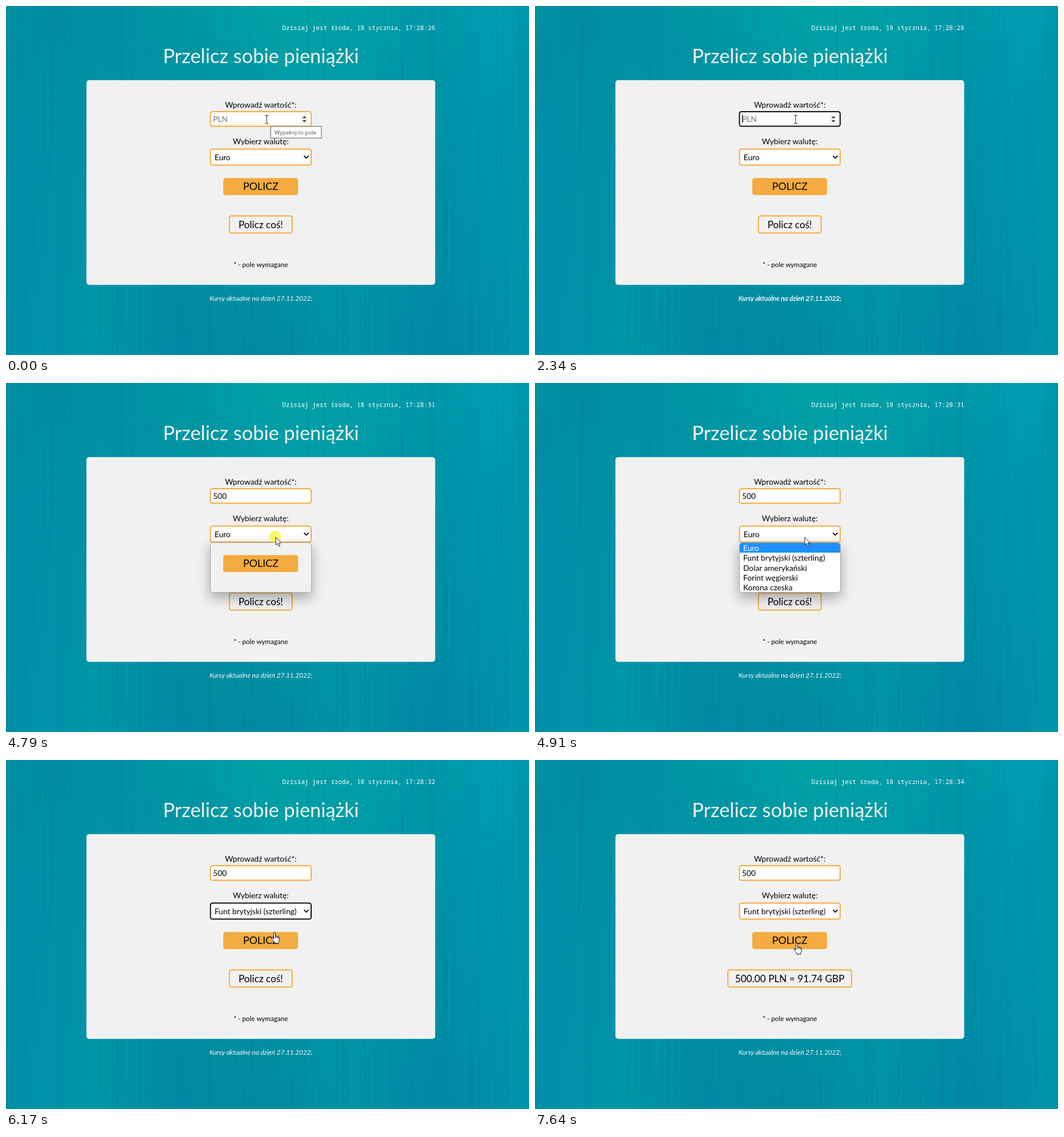
Animation of 917x611 px, one loop 8000 ms. Source, as an HTML page with a canvas:

```html
<!DOCTYPE html>
<html lang="pl">
<head>
<meta charset="utf-8">
<title>Przelicz sobie pieniążki</title>
<style>
html, body { margin: 0; width: 100%; height: 100%; overflow: hidden; }
body {
  position: relative;
  background: linear-gradient(90deg, #008fa5, #008da3 11%, #0097a4 32%, #00a2a6 53%, #00a0a6 65%, #0099ab 82%, #009cb0 93%, #0098ac);
}
canvas, svg { position: absolute; left: 0; top: 0; }
svg { font: 13.75px Lato, sans-serif; }
.mid { text-anchor: middle; }
.big { font-size: 17.2px; }
.small { font-size: 11.7px; }
.field { fill: #fff; stroke: #f4ab3f; stroke-width: 2; }
.focus { stroke: #111; }
#popup {
  position: absolute; left: 357.5px; top: 279.3px; width: 176px; height: 85.8px;
  border: 1px solid #aaa; border-radius: 5px; overflow: hidden;
  box-shadow: 0 9px 22px rgba(0, 0, 0, .32);
  font: 13.75px/17.16px Lato, sans-serif;
}
#popup div { padding-left: 6.5px; white-space: nowrap; }
#popup.full { background: #fff; }
#popup:not(.full) div { visibility: hidden; }
#popup .on { background: #1e90ff; color: #fff; }
</style>
</head>
<body>
<canvas id="wall" width="917" height="611"></canvas>

<svg width="917" height="611">
  <text id="clock" x="752.5" y="42" text-anchor="end" fill="#fff" style="font:10.9px 'Noto Sans Mono',monospace"></text>
  <text class="mid" x="447" y="100" fill="#f1f1f1" font-size="34.4">Przelicz sobie pieniążki</text>
  <rect x="141" y="129.7" width="611.5" height="358.5" rx="5" fill="#f1f1f1"/>

  <text class="mid" x="446.7" y="177.5">Wprowadź wartość*:</text>
  <rect id="amountBox" class="field" x="358.5" y="185" width="176.5" height="25.5" rx="3.5"/>
  <text id="amount" x="363" y="203"></text>
  <rect id="caret" y="190" width="1" height="15"/>
  <g id="spinner">
    <path fill="#efefef" d="M517 190h12v16h-12z"/>
    <path fill="#333" d="M519.8 196.3l3.4-3.6 3.4 3.6zM519.8 199.9l3.4 3.6 3.4-3.6z"/>
  </g>

  <text class="mid" x="446.7" y="242">Wybierz walutę:</text>
  <rect id="currencyBox" class="field" x="358.5" y="250.5" width="176.5" height="28" rx="3.5"/>
  <text id="currency" x="365.8" y="270"></text>
  <path d="M522.5 262.3l4 4 4-4" fill="none" stroke="#000" stroke-width="1.8"/>

  <rect x="381" y="301.3" width="131" height="29.7" rx="4" fill="#f4ab3f"/>
  <text class="mid" x="446.7" y="322.3" font-size="17.9">POLICZ</text>

  <rect id="resultBox" class="field" style="fill:none" y="367.5" height="30" rx="3.5"/>
  <text id="result" class="mid big" x="446.7" y="388.6"></text>
  <text class="mid small" x="446.7" y="456.5">* - pole wymagane</text>
  <text id="footer" class="mid small" x="447" y="515.8" fill="#f4f8f8" stroke="#f4f8f8" font-style="italic">Kursy aktualne na dzień 27.11.2022;</text>

  <g id="hint">
    <rect x="464" y="210.8" width="89" height="20.4" fill="#fff" stroke="#555"/>
    <text class="mid" x="508.7" y="225" fill="#505050" style="font:9.8px 'Open Sans',sans-serif">Wypełnij to pole.</text>
  </g>
</svg>

<div id="popup"></div>

<svg width="917" height="611">
  <g id="pointer" stroke-linejoin="round">
    <circle id="click" cx="-1" cy="-1" r="10.5" fill="#fff200" fill-opacity=".6"/>
    <path id="beam" fill="none" stroke="#222" d="M-3-6.5h2.2L0-6 .8-6.5H3M0-6V7M-3 7.5h2.2L0 7 .8 7.5H3"/>
    <path id="arrow" fill="#fff" stroke="#111" stroke-width=".9" d="M0 0V13.3L3 10.5 5.3 15.8 7.5 14.9 5.2 9.7H9.4Z"/>
    <path id="hand" fill="#fff" stroke="#111" stroke-width="1" transform="translate(-5.5)"
      d="M4.5 12.5V2.2Q4.5.6 6 .6T7.5 2.2V7.3Q9.3 6.2 10 7.9 11.8 7 12.2 8.8 14.2 8.2 14.2 10.3V14Q14 16 12.8 17.5V20H6V18.3Q3 15.5.9 12 .3 10 2.2 10.4 3.5 11 4.5 12.5ZM7.5 7.3V11M10 8V11M12.2 8.8V11.5"/>
  </g>
</svg>

<script>
const LOOP = 8000;
const $ = id => document.getElementById(id);
const show = (id, on) => { $(id).style.visibility = on ? 'visible' : 'hidden'; };
const within = (t, ...spans) => spans.some(([from, to]) => t >= from && t < to);
const passed = (t, times) => times.filter(at => t >= at).length;

const ticks = [680, 1700, 2670, 3640, 4650, 5540, 6640, 7640];
const keyPresses = [2400, 2730, 2940];
const options = ['Euro', 'Funt brytyjski (szterling)', 'Dolar amerykański', 'Forint węgierski', 'Korona czeska'];

// Pointer path: time, x, y of the hot spot
const path = [
  [3980, 457, 198], [4050, 458, 212], [4130, 461, 245], [4200, 465.5, 268.5],
  [4300, 470, 278], [4450, 472, 276], [4650, 473, 270.3],
  [5440, 473, 270.3], [5640, 470.3, 293], [5870, 470.5, 301],
  [6370, 470.5, 301], [6490, 456.8, 324], [6640, 456.8, 324], [6770, 458.7, 320]
];

function pointerAt(t) {
  const next = path.findIndex(key => key[0] > t);
  if (next === 0) return path[0].slice(1);
  if (next < 0) return path[path.length - 1].slice(1);
  const [t0, x0, y0] = path[next - 1], [t1, x1, y1] = path[next];
  const k = (t - t0) / (t1 - t0);
  return [x0 + (x1 - x0) * k, y0 + (y1 - y0) * k];
}

function paintWall() {
  const c = $('wall').getContext('2d');
  const fill = (x, y, colors) => {
    const g = c.createLinearGradient(0, 0, x, y);
    colors.forEach((color, i) => g.addColorStop(i / (colors.length - 1), color));
    c.fillStyle = g;
    c.fillRect(0, 0, 917, 611);
  };
  fill(917, 0, ['#008fa8', '#0096a9', '#0089a2', '#008aa2', '#0092a7', '#0087a2', '#0095ac']);
  c.globalCompositeOperation = 'destination-in';
  fill(0, 611, ['#0000', '#0006', '#000a', '#000']);
  c.globalCompositeOperation = 'source-over';

  let seed = 7;
  const rnd = () => (seed = seed * 16807 % 2147483647) / 2147483647;
  for (let i = 0; i < 700; i++) {
    c.fillStyle = rnd() < .5 ? 'rgba(0,190,190,.05)' : 'rgba(0,90,130,.05)';
    c.fillRect(rnd() * 917, rnd() * 800 - 200, 1 + rnd() * 2, 60 + rnd() * 340);
  }
}

function draw(t) {
  $('clock').textContent = 'Dzisiaj jest środa, 18 stycznia, 17:28:' + (26 + passed(t, ticks));

  const typed = passed(t, keyPresses);
  $('amount').textContent = typed ? '500'.slice(0, typed) : 'PLN';
  $('amount').style.fill = typed ? '#000' : '#757575';
  $('amountBox').classList.toggle('focus', within(t, [1280, 4790]));
  $('caret').setAttribute('x', 363 + 7.8 * typed);
  show('caret', within(t, [1280, 1790], [2340, 3430], [3980, 4530]));
  show('spinner', t < 4790);
  show('hint', t < 1190);
  $('footer').style.strokeWidth = within(t, [1190, 4790]) ? .35 : 0;

  const [x, y] = pointerAt(t);
  $('currency').textContent = options[t < 6040 ? 0 : 1];
  $('currencyBox').classList.toggle('focus', within(t, [6040, 7100]));
  $('popup').style.display = within(t, [4790, 6040]) ? 'block' : 'none';
  $('popup').classList.toggle('full', t >= 4860);
  [...$('popup').children].forEach((row, i) => row.classList.toggle('on', i === (y < 298 ? 0 : 1)));

  const done = t >= 7230;
  const half = done ? 108.5 : 55;
  $('result').textContent = done ? '500.00 PLN = 91.74 GBP' : 'Policz coś!';
  $('resultBox').setAttribute('x', 446.7 - half);
  $('resultBox').setAttribute('width', 2 * half);

  $('pointer').setAttribute('transform', `translate(${x} ${y})`);
  const shape = y < 211 ? 'beam' : t < 6170 ? 'arrow' : 'hand';
  for (const id of ['beam', 'arrow', 'hand']) show(id, id === shape);
  show('click', within(t, [1190, 1380], [4790, 4910], [6040, 6170], [7100, 7230]));
}

function frame() {
  draw(performance.now() % LOOP);
  requestAnimationFrame(frame);
}

for (const name of options) {
  const row = document.createElement('div');
  row.textContent = name;
  $('popup').append(row);
}
paintWall();
frame();
</script>
</body>
</html>
```
